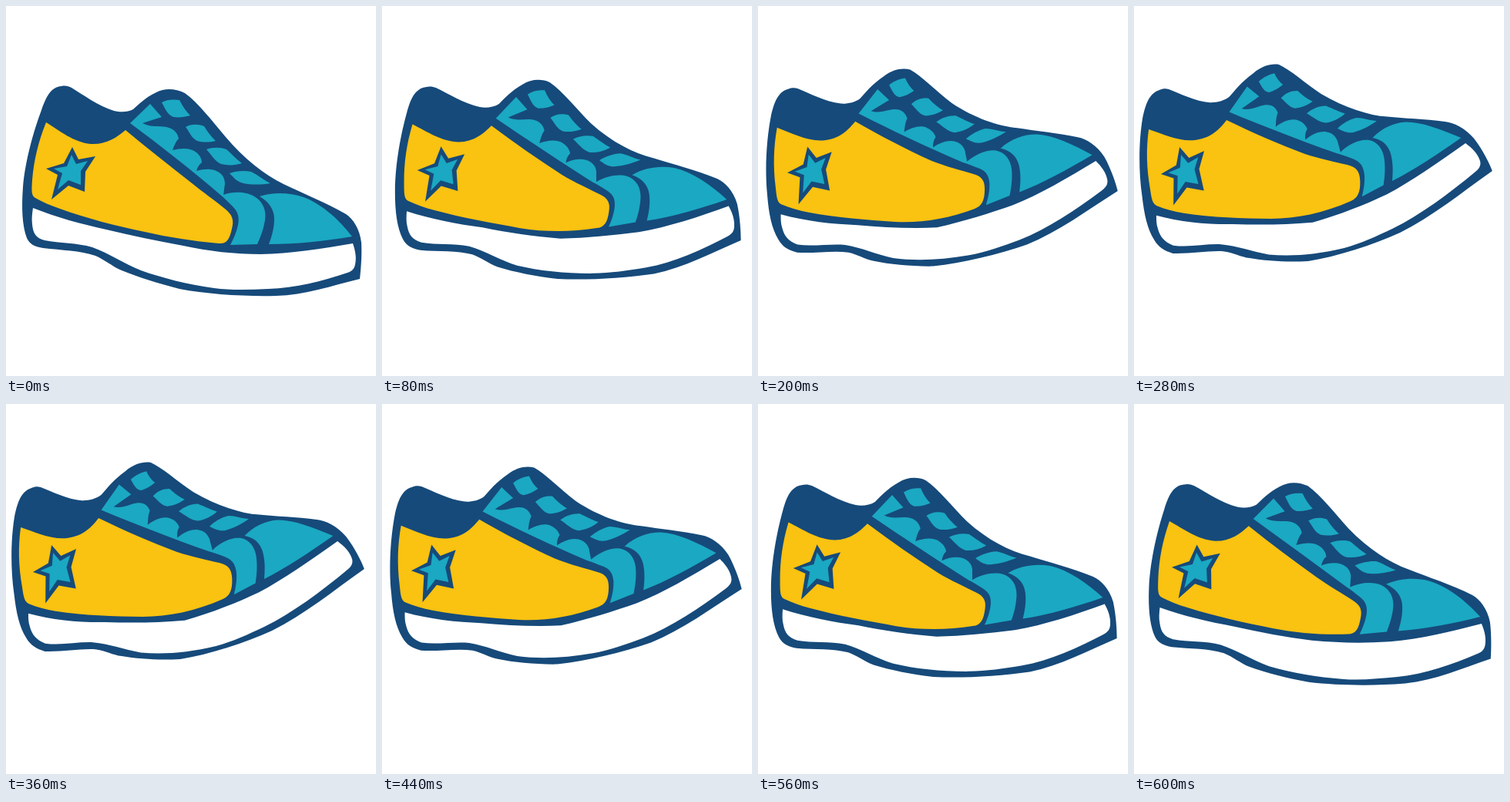
An HTML page for the animation above (640 ms loop, 480x480 px).

```html
<!DOCTYPE html>
<html lang="en">
<head>
<meta charset="utf-8">
<title>Bending sneaker</title>
<style>
  html, body { margin: 0; width: 100%; height: 100%; overflow: hidden; background: #fff; }
  svg { display: block; width: 100vw; height: 100vh; }
</style>
</head>
<body>
<svg id="stage" viewBox="0 0 480 480"></svg>
<script>
const NAVY = '#164a7a', YELLOW = '#fac211', TEAL = '#1ba8c2', WHITE = '#fff';

// The shoe at rest: [fill, path]
const parts = [
  [NAVY, `M72,104 C58,105 52,118 46,135 C36,162 25,200 22,235 C20,262 21,285 27,301
    C31,310 38,312 48,314 C72,317 96,317 116,324 C128,329 138,338 150,343
    C172,352 198,360 225,367 C262,374 310,377 350,376 C388,375 422,363 459,354
    C460,345 462,325 461,307 C459,289 450,276 441,270 C415,255 385,243 360,231
    C335,219 309,198 285,170 C268,150 250,126 232,113 C220,107 206,106 195,112
    C180,119 172,128 165,134 C158,138 148,138 140,136 C120,130 100,115 85,106
    C81,104 77,103 72,104 Z`],
  [YELLOW, `M52,151 C70,162 88,177 110,179 C130,180 143,171 155,161 C184,185 212,207 240,229
    C256,242 272,253 284,263 C294,271 296,278 293,289 C290,303 286,309 276,308
    C243,305 211,300 180,293 C142,285 106,276 70,263 C58,259 47,254 38,249
    C33,246 33,241 34,226 C36,200 42,176 52,151 Z`],
  [WHITE, `M35,262 C65,274 98,283 130,290 C163,298 197,305 230,311 C263,318 296,322 330,322
    C370,321 410,315 450,308 C453,317 455,326 453,335 C452,341 449,344 443,346
    C410,357 376,366 340,367 C316,368 292,369 270,366 C235,361 203,353 175,343
    C153,334 134,321 112,313 C92,307 70,308 50,304 C39,301 35,295 34,283 C33,276 34,269 35,262 Z`],
  [TEAL, `M187,127 L202,144 L177,152 C188,158 198,155 208,157 C218,159 223,165 224,172
    C220,176 218,182 216,187 C228,184 240,184 247,190 C252,194 254,199 254,203
    C250,206 248,210 247,214 C260,210 272,211 279,218 C283,222 284,227 284,231
    C283,236 283,240 282,245 C295,240 312,241 322,247 C334,254 338,266 336,278
    C334,290 330,300 326,309 L291,310 C295,302 299,294 301,284 C303,274 301,267 294,260
    C288,254 282,248 277,244 C240,212 200,181 161,152 Z`],
  [TEAL, `M329,247 C347,241 368,242 386,248 C410,257 432,277 449,299
    C414,305 377,309 341,309 C345,298 348,288 348,276 C348,264 341,254 329,247 Z`],
  [TEAL, 'M202,125 C209,121 217,121 225,122 C229,130 234,137 239,142 C232,144 225,145 217,144 C209,141 206,132 202,125 Z'],
  [TEAL, 'M233,157 C240,153 249,153 257,156 C262,164 266,169 272,175 C264,177 255,177 248,175 C240,171 238,163 233,157 Z'],
  [TEAL, 'M260,186 C268,183 278,183 286,186 C294,193 299,199 306,204 C297,207 288,207 279,205 C270,201 266,192 260,186 Z'],
  [TEAL, 'M290,217 C298,214 309,213 318,215 C327,219 334,226 343,230 C331,232 318,232 308,230 C299,228 295,222 290,217 Z'],
  [NAVY, 'M86,183 L94,199 L116,195 L103,215 L102,241 L81,233 L59,251 L67,219 L52,211 L75,204 Z'],
  [TEAL, 'M85,193 L91,205 L106,201 L97,214 L97,232 L81,226 L67,238 L73,217 L62,211 L79,208 Z']
];

// Pins: x,y at rest, half bent, fully bent
const HALF = 0.525;
const pins = [
  [72,104, 50,106, 33,109],
  [212,108, 193,91, 172,78],
  [150,137, 130,129, 108,124],
  [52,151, 34,155, 19,160],
  [52,211, 43,214, 35,218],
  [116,195, 103,191, 91,188],
  [35,262, 31,268, 29,272],
  [450,308, 447,238, 430,178],
  [459,354, 467,281, 465,214],
  [28,303, 28,304, 27,304],
  [40,312, 42,316, 42,319],
  [156,160, 137,152, 121,147],
  [239,142, 216,122, 193,102],
  [290,217, 278,191, 264,159],
  [343,230, 331,186, 315,149],
  [291,310, 295,276, 296,247],
  [341,309, 343,265, 335,227],
  [225,367, 228,348, 226,331],
  [150,343, 150,336, 150,327],
  [350,376, 352,334, 345,294],
  [230,311, 232,297, 232,281],
  [130,290, 130,286, 128,283],
  [441,270, 429,204, 403,150]
];

// Bend amount for each step from rest to the peak
const STEP = 40, COUNT = 16;
const bend = [0, 0.17, 0.36, HALF, 0.685, 0.816, 0.925, 1, 1.03];

// Thin plate spline through the pins
const SCALE = 100, SOFT = 0.012;
function basis(x, y) {
  const radial = pins.map(p => {
    const r2 = ((x - p[0]) ** 2 + (y - p[1]) ** 2) / SCALE ** 2;
    return r2 ? r2 * Math.log(r2) / 2 : 0;
  });
  return [...radial, 1, x / SCALE, y / SCALE];
}

function solve(rows, size) {
  for (let c = 0; c < size; c++) {
    let best = c;
    for (let r = c + 1; r < size; r++) {
      if (Math.abs(rows[r][c]) > Math.abs(rows[best][c])) best = r;
    }
    [rows[c], rows[best]] = [rows[best], rows[c]];
    const pivot = rows[c][c];
    rows[c] = rows[c].map(v => v / pivot);
    rows.forEach((row, r) => {
      const k = row[c];
      if (r !== c && k) rows[r] = row.map((v, i) => v - k * rows[c][i]);
    });
  }
  return rows.map(row => row.slice(size));
}

function fit() {
  const n = pins.length;
  const rows = pins.map((p, i) => {
    const row = basis(p[0], p[1]);
    row[i] += SOFT;
    return [...row, p[2] - p[0], p[3] - p[1], p[4] - p[0], p[5] - p[1]];
  });
  for (let j = 0; j < 3; j++) {
    const side = pins.map(p => [1, p[0] / SCALE, p[1] / SCALE][j]);
    rows.push([...side, 0, 0, 0, 0, 0, 0, 0]);
  }
  return solve(rows, n + 3);
}

const weights = fit();

function warp(x, y, u) {
  const d = [0, 0, 0, 0];
  basis(x, y).forEach((b, i) => weights[i].forEach((w, j) => { d[j] += b * w; }));
  const half = u * (1 - u) / (HALF * (1 - HALF));
  const full = u * (u - HALF) / (1 - HALF);
  return [x + d[0] * half + d[2] * full, y + d[1] * half + d[3] * full];
}

function warpPath(path, u) {
  return path.replace(/(\d+),(\d+)/g, (m, x, y) =>
    warp(+x, +y, u).map(v => v.toFixed(2)).join());
}

const poses = bend.map(u => parts.map(([, path]) => warpPath(path, u)));
const stage = document.getElementById('stage');
const shapes = parts.map(([fill]) => {
  const el = document.createElementNS('http://www.w3.org/2000/svg', 'path');
  el.setAttribute('fill', fill);
  return stage.appendChild(el);
});

let start = null;
function draw(now) {
  if (start === null) start = now;
  const step = Math.floor((now - start) / STEP) % COUNT;
  const pose = poses[Math.min(step, COUNT - step)];
  shapes.forEach((el, i) => el.setAttribute('d', pose[i]));
  requestAnimationFrame(draw);
}
draw(performance.now());
</script>
</body>
</html>
```
